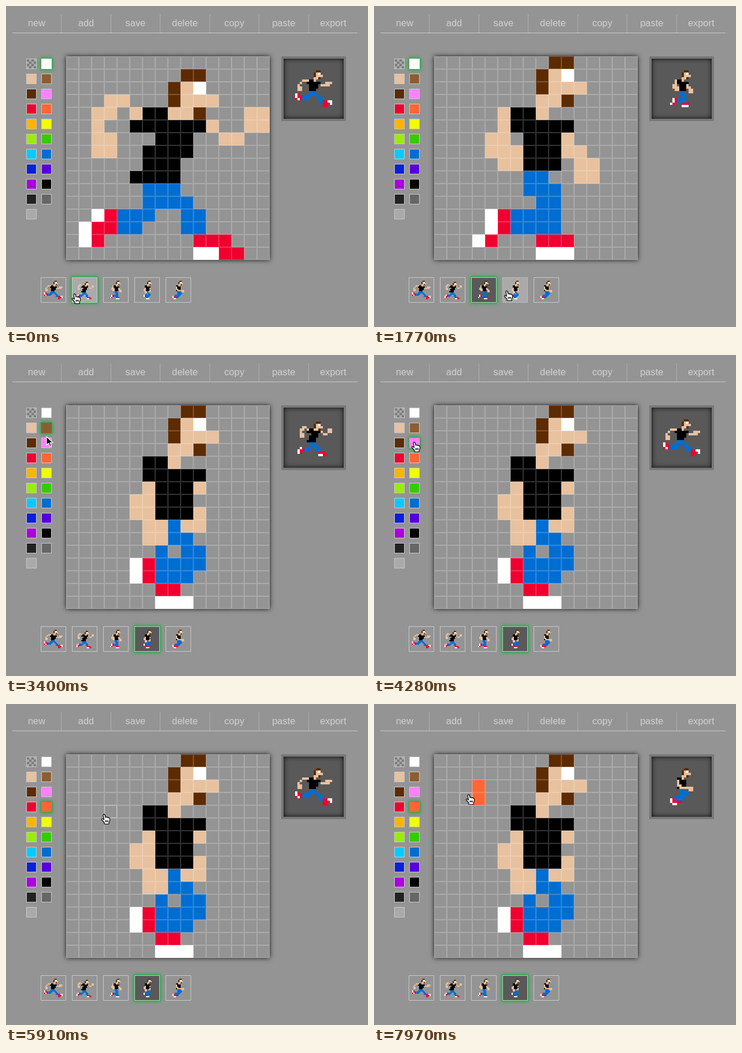
Animation of 626 by 555 pixels, one loop 8 s. Source, as an HTML page with a canvas:

```html
<!DOCTYPE html>
<html lang="en">
<head>
<meta charset="utf-8">
<title>Sprite editor</title>
<style>
html, body { margin: 0; width: 100%; height: 100%; overflow: hidden; background: #949494; }
canvas { display: block; }
</style>
</head>
<body>
<canvas id="stage" width="626" height="555"></canvas>
<script>
const ctx = document.getElementById('stage').getContext('2d');
const LOOP = 8000, STEP = 147.6, LAST = 54;
const BG = '#949494', LINE = '#c8c8c8', DARK = '#595959', HOVER = '#aaa';
const SKIN = '#e8c19e', HAIR = '#5c2b02', BLUE = '#006dd2', RED = '#f0002f', ORANGE = '#ff6633';
const CELL = 22;
const GRID = { x: 104, y: 87, size: 16 * CELL };

const SWATCHES = [
  null, '#fff', SKIN, '#8b5d33', HAIR, '#ff80ff', RED, ORANGE,
  '#ffb400', '#f0ff00', '#99ee00', '#33cc00', '#00ccff', BLUE,
  '#0a1ee0', '#5500dd', '#aa00dd', '#000', '#222', '#666', '#aaa'
].map((color, i) => ({ color, x: 35 + i % 2 * 26, y: 91 + (i >> 1) * 26, size: 18 }));
const THUMBS = Array.from({ length: 5 }, (_, i) => ({ x: 60 + i * 54, y: 469, size: 44 }));

// The runner: one outline per garment, in units of one cell.
const HEAD = {
  [SKIN]: 'M9 1h1v1h2v1h-2v1h-1v1h-1v-2h1z',
  [HAIR]: 'M9 0h2v1h-2zM8 1h1v2h-1zM10 3h1v1h-1z',
  '#fff': 'M10 1h1v1h-1z'
};
const TORSO = 'M6 4h2v1h3v1h-1v3h-3v-3h-1z';
const POSES = [
  { shirt: 'M6 4h2v1h3v1h-1v2h-1v1h-3v-3h-1v-1h1z',
    arms: 'M3 4h3v1h-3v1h-1v1h1v2h-2v-3h1v-1h1zM11 6h2v1h-2zM13 5h3v1h-1v1h-2z',
    jeans: 'M6 9h3v1h1v1h1v1h1v2h-2v-2h-1v-1h-2v1h-1v1h-3v-2h2v-1h1z',
    shoes: 'M1 10h1v1h1v2h-3v-1h1zM12 13h2v1h1v1h-1v1h-2z',
    soles: 'M0 10h1v2h-1zM1 12h1v1h-1zM14 13h2v2h-1v-1h-1z' },
  { bob: 1,
    shirt: 'M6 4h2v1h3v1h-1v2h-1v2h-4v-1h1v-2h1v-1h-2v-1h1z',
    arms: 'M3 3h2v1h-1v1h-1v1h1v2h-2v-4h1zM5 4h1v1h-1zM11 5h1v1h-1zM12 6h2v1h-2zM14 4h2v2h-2z',
    jeans: 'M6 10h3v1h1v1h1v2h-2v-2h-2v1h-1v1h-2v-2h2z',
    shoes: 'M3 12h1v2h-1v1h-1v-2h1zM10 14h3v1h1v1h-2v-1h-2z',
    soles: 'M2 12h1v1h-1v2h-1v-2h1zM10 15h2v1h-2z' },
  { shirt: TORSO,
    arms: 'M5 4h1v2h-1zM4 6h2v1h1v2h-2v-1h-1zM10 6h1v1h1v1h1v2h-2v-2h-1z',
    jeans: 'M7 9h2v1h1v4h-4v-2h2v-1h-1z',
    shoes: 'M5 12h1v2h-1zM4 14h1v1h-1zM8 14h3v1h-3z',
    soles: 'M4 12h1v2h-1zM3 14h1v1h-1zM8 15h3v1h-3z' },
  { shirt: TORSO,
    arms: 'M6 6h1v3h-2v-2h1zM6 9h2v2h-2zM10 6h1v1h-1zM10 8h1v2h-2v-1h1z',
    jeans: 'M8 9h1v1h1v1h1v2h-1v1h-3v-3h1zM8 11v1h1v-1z',
    shoes: 'M6 12h1v2h-1zM7 14h2v1h-2z',
    soles: 'M5 12h1v2h-1zM7 15h3v1h-3z' },
  { shirt: 'M6 4h2v1h2v5h-3v-1h-1z',
    arms: 'M6 5h1v2h1v1h5v2h-2v-1h-4v-1h-1z',
    jeans: 'M7 9h3v1h1v2h-1v1h-1v1h-4v-2h2z',
    shoes: 'M4 13h1v1h3v1h-4z',
    soles: 'M3 13h1v2h-1zM4 15h2v1h-2z' }
];

// Resting points of the pointer as [step, x, y]; it eases from one to the next.
const STOPS = [
  [0, 119, 497], [2, 119, 497], [6, 179, 494], [9, 182, 494], [12, 230, 492], [13, 230, 492],
  [16, 46, 84], [18, 46, 98], [23, 70, 141], [31, 70, 152], [34, 74, 183], [36, 74, 183],
  [40, 170, 190], [43, 173, 186], [47, 175, 146], [50, 175, 146], [LAST, 164, 156]
];
const CLICKS = [7, 13, 21, 28, 35, 45, 48];

const HAND = new Path2D('M-2 2Q-1 -.5 1 1.5L2 6Q4 4.5 5 6.5 7 5 7.5 7 9.5 6.5 9.5 9V12L8 14.5V17.5H0V15L-4.5 10Q-5 7.5 -2.5 8.5L-.5 10Z');
const FINGERS = new Path2D('M2.2 11V14M4.2 11V14M6.2 11V14');
const ARROW = new Path2D('M0 0V15L3.5 11.5 6 17 8.5 16 6 10.5H11Z');

const inside = (p, b) => p.x >= b.x && p.x < b.x + b.size && p.y >= b.y && p.y < b.y + b.size;
const cellAt = p => ({
  x: GRID.x + Math.floor((p.x - GRID.x) / CELL) * CELL,
  y: GRID.y + Math.floor((p.y - GRID.y) / CELL) * CELL
});

function pointerAt(step) {
  const i = Math.max(1, STOPS.findIndex(s => s[0] >= step));
  const [s0, x0, y0] = STOPS[i - 1], [s1, x1, y1] = STOPS[i];
  const k = (step - s0) / (s1 - s0), ease = k * k * (3 - 2 * k);
  return { x: Math.round(x0 + (x1 - x0) * ease), y: Math.round(y0 + (y1 - y0) * ease) };
}

// Each click acts on whatever lies under the pointer.
function stateAt(step) {
  const state = { pose: 1, color: 1, painted: [] };
  for (const click of CLICKS.filter(c => c <= step)) {
    const p = pointerAt(click);
    const thumb = THUMBS.findIndex(t => inside(p, t));
    const swatch = SWATCHES.findIndex(s => inside(p, s));
    if (thumb >= 0) state.pose = thumb;
    else if (swatch >= 0) state.color = swatch;
    else if (inside(p, GRID)) state.painted.push({ ...cellAt(p), color: SWATCHES[state.color].color });
  }
  return state;
}

function box(color, x, y, w, h = w) {
  ctx.fillStyle = color;
  ctx.fillRect(x, y, w, h);
}

function outline(color, x, y, size, dash = [], width = 1) {
  ctx.strokeStyle = color;
  ctx.lineWidth = width;
  ctx.setLineDash(dash);
  ctx.strokeRect(x + width / 2, y + width / 2, size - width, size - width);
  ctx.setLineDash([]);
}

function glow(color, blur, paint) {
  ctx.save();
  ctx.shadowColor = color;
  ctx.shadowBlur = blur;
  paint();
  ctx.restore();
}

const selection = ({ x, y, size }) => glow('#00b030', 6, () => box('#35a853', x - 1, y - 1, size + 2));

function drawPose({ bob = 0, shirt, arms, jeans, shoes, soles }, x, y, unit) {
  const fill = (color, path) => {
    ctx.fillStyle = color;
    ctx.fill(new Path2D(path), 'evenodd');
  };
  ctx.save();
  ctx.translate(x, y + bob * unit);
  ctx.scale(unit, unit);
  for (const color in HEAD) fill(color, HEAD[color]);
  ctx.translate(0, -bob);
  fill('#000', shirt);
  fill(SKIN, arms);
  fill(BLUE, jeans);
  fill(RED, shoes);
  fill('#fff', soles);
  ctx.restore();
}

function drawMenu() {
  ctx.font = '16.4px "Liberation Sans", Arial, sans-serif';
  ctx.textAlign = 'center';
  box(LINE, 11, 46, 597, 1);
  ['new', 'add', 'save', 'delete', 'copy', 'paste', 'export'].forEach((label, i) => {
    ctx.fillStyle = '#d2d2d2';
    ctx.fillText(label, 53 + i * 85.45, 35);
    const edge = Math.round(95.4 + i * 85.45);
    for (let y = 15; y < 46 && i < 6; y += 2) box(LINE, edge, y, 1);
  });
}

function drawSwatches(selected, mouse) {
  SWATCHES.forEach((s, i) => {
    const { x, y, size, color } = s;
    if (i === selected) selection(s);
    box(color || '#a8a8a8', x, y, size);
    for (let k = 0; k < 16 && !color; k++) {
      const cx = k % 4, cy = k >> 2;
      if ((cx + cy) % 2 === 0) box('#7c7c7c', x + 1 + cx * 4, y + 1 + cy * 4, 4);
    }
    if (i === selected) return;
    if (inside(mouse, s)) outline('#d8d8d8', x - 3, y - 3, size + 6, [4, 3], 3);
    else outline(LINE, x, y, size);
  });
}

function drawThumbs(selected, mouse) {
  THUMBS.forEach((t, i) => {
    const { x, y, size } = t, over = inside(mouse, t), chosen = i === selected;
    if (chosen) selection(t);
    if (chosen || over) box(over ? HOVER : DARK, x, y, size);
    outline(chosen ? '#b5d5bc' : LINE, x, y, size, over && !chosen ? [2, 2] : []);
    drawPose(POSES[i], x + 6, y + 6, 2);
  });
}

function drawGrid({ pose, painted }, mouse) {
  const { x, y, size } = GRID;
  glow('rgba(0,0,0,.85)', 8, () => box(BG, x, y, size));
  drawPose(POSES[pose], x, y, CELL);
  painted.forEach(c => box(c.color, c.x, c.y, CELL));
  for (let cx = x; cx < x + size; cx += CELL) {
    for (let cy = y; cy < y + size; cy += CELL) outline('rgba(255,255,255,.2)', cx, cy, CELL);
  }
  if (inside(mouse, GRID)) {
    const cell = cellAt(mouse);
    outline(LINE, cell.x, cell.y, CELL);
  }
}

function drawPreview(step) {
  box('#787878', 476, 87, 112);
  box(DARK, 480, 91, 104);
  ctx.save();
  ctx.beginPath();
  ctx.rect(480, 91, 104, 104);
  ctx.clip();
  glow('rgba(0,0,0,.9)', 8, () => outline('#000', 460, 71, 144, [], 20));
  ctx.restore();
  drawPose(POSES[Math.floor(step * 1.36 + .68) % POSES.length], 500, 111, 4);
}

function drawPointer(mouse) {
  const active = [...SWATCHES, ...THUMBS, GRID].some(b => inside(mouse, b));
  const shape = active ? HAND : ARROW;
  ctx.save();
  ctx.translate(mouse.x, mouse.y);
  ctx.lineJoin = 'round';
  ctx.lineWidth = 1.2;
  ctx.fillStyle = active ? '#fff' : '#000';
  ctx.strokeStyle = active ? '#000' : '#fff';
  ctx.fill(shape);
  ctx.stroke(shape);
  if (active) ctx.stroke(FINGERS);
  ctx.restore();
}

function draw(time) {
  const step = Math.min(LAST, Math.floor((time % LOOP + 6) / STEP));
  const mouse = pointerAt(step), state = stateAt(step);
  box(BG, 0, 0, 626, 555);
  drawMenu();
  drawSwatches(state.color, mouse);
  drawGrid(state, mouse);
  drawPreview(step);
  drawThumbs(state.pose, mouse);
  drawPointer(mouse);
}

const start = performance.now();
function tick() {
  draw(performance.now() - start);
  requestAnimationFrame(tick);
}
tick();
</script>
</body>
</html>
```
